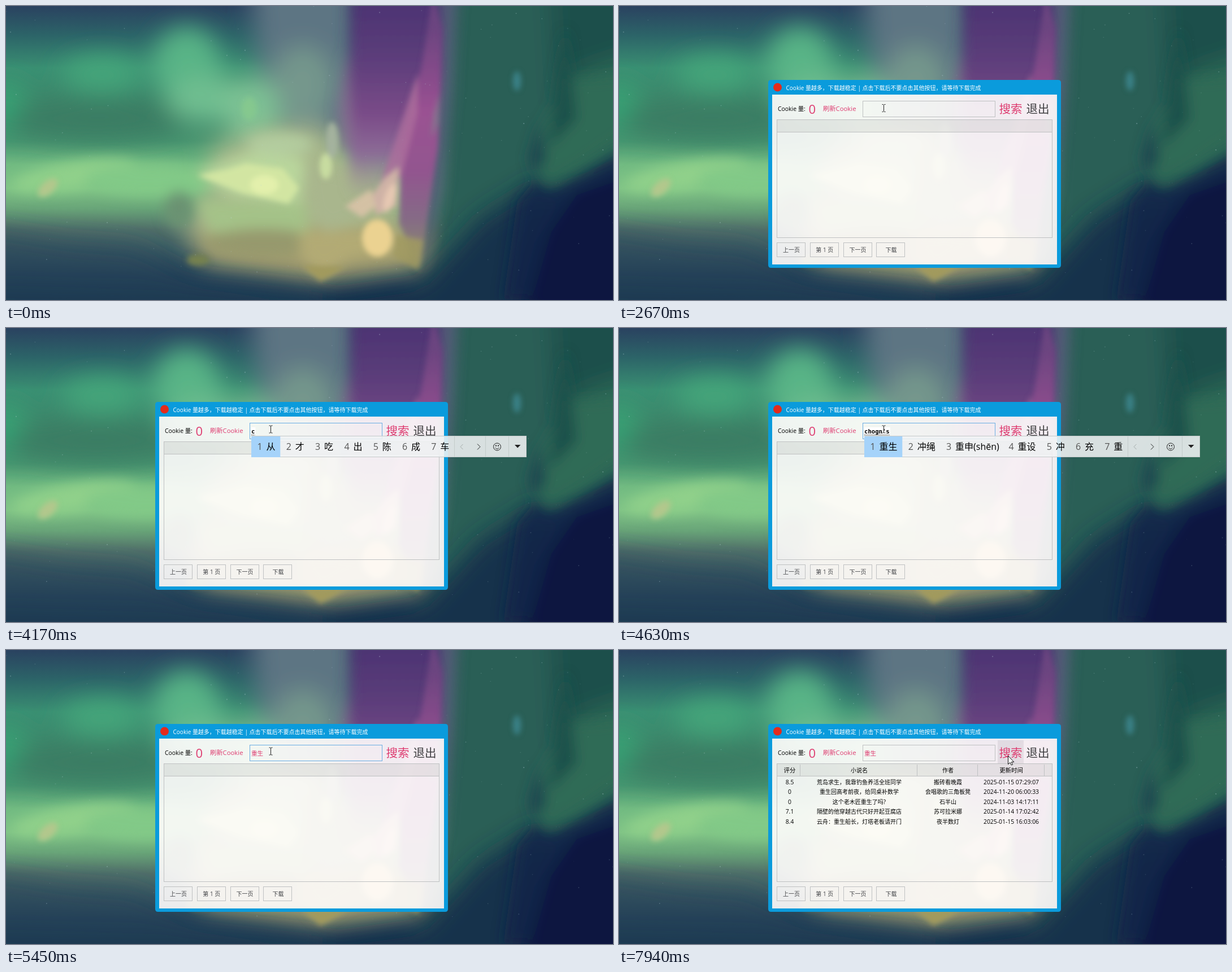
Write an HTML page that moves like this. It is 1074 by 521 pixels and loops after 8 s.

```html
<!DOCTYPE html>
<html lang="zh-CN">
<head>
<meta charset="utf-8">
<style>
html, body { margin: 0; width: 100%; height: 100%; overflow: hidden; background: #16304e; }
svg { display: block; width: 1074px; height: 521px; }
text { font-family: "Open Sans", "Noto Sans CJK SC", "Noto Sans CJK", sans-serif; font-size: 10px; white-space: pre; }
.mid { text-anchor: middle; }
.pink { fill: #de3c70; }
.line { fill: none; stroke: #bfc1c2; }
.mono { font: bold 10.6px "DejaVu Sans Mono", monospace; }
#bar text { font-size: 16px; }
</style>
</head>
<body>
<svg viewBox="0 0 1074 521">
  <defs>
    <linearGradient id="sky" x2="0" y2="1">
      <stop stop-color="#2a4260"/><stop offset=".1" stop-color="#2c6468"/>
      <stop offset=".21" stop-color="#3a8f72"/><stop offset=".37" stop-color="#3d8468"/>
      <stop offset=".46" stop-color="#47946f"/><stop offset=".54" stop-color="#72bb82"/>
      <stop offset=".62" stop-color="#80c486"/><stop offset=".69" stop-color="#68a478"/>
      <stop offset=".76" stop-color="#506f69"/><stop offset=".84" stop-color="#365660"/>
      <stop offset=".92" stop-color="#1f3e56"/><stop offset="1" stop-color="#16304e"/>
    </linearGradient>
    <linearGradient id="violet" gradientUnits="userSpaceOnUse" x1="0" y1="0" x2="0" y2="350">
      <stop stop-color="#4d3473"/><stop offset=".25" stop-color="#5b3d7a"/>
      <stop offset=".55" stop-color="#7a4b88"/><stop offset=".75" stop-color="#8d6c97"/>
      <stop offset="1" stop-color="#a09a94" stop-opacity="0"/>
    </linearGradient>
    <linearGradient id="rose" gradientUnits="userSpaceOnUse" x1="0" y1="40" x2="0" y2="460">
      <stop stop-color="#6c4480"/><stop offset=".35" stop-color="#9a5192"/>
      <stop offset=".6" stop-color="#92558f"/><stop offset=".8" stop-color="#856a86"/>
      <stop offset="1" stop-color="#8b8f68"/>
    </linearGradient>
    <filter id="b5" filterUnits="userSpaceOnUse" x="-100" y="-100" width="1274" height="721"><feGaussianBlur stdDeviation="5"/></filter>
    <filter id="b11" filterUnits="userSpaceOnUse" x="-100" y="-100" width="1274" height="721"><feGaussianBlur stdDeviation="11"/></filter>
    <filter id="b22" filterUnits="userSpaceOnUse" x="-100" y="-100" width="1274" height="721"><feGaussianBlur stdDeviation="22"/></filter>
  </defs>

  <!-- aurora -->
  <rect width="1074" height="521" fill="url(#sky)"/>
  <g filter="url(#b22)">
    <ellipse cx="320" cy="105" rx="60" ry="68" fill="#58b486"/>
    <ellipse cx="170" cy="120" rx="70" ry="32" fill="#45a67a"/>
    <ellipse cx="0" cy="182" rx="40" ry="45" fill="#38a476"/>
    <ellipse cx="160" cy="200" rx="160" ry="36" fill="#3a7d64"/>
    <path d="M430-80H620V230H500L450 130z" fill="#5d7583"/>
    <ellipse cx="525" cy="140" rx="55" ry="70" fill="#75978c"/>
    <ellipse cx="360" cy="165" rx="75" ry="42" fill="#6fbe90"/>
    <ellipse cx="435" cy="185" rx="48" ry="60" fill="#7ec294"/>
    <path d="M360 250L480 215 560 215 620 270 690 300 735 470 560 492 350 460 310 380 370 320z" fill="#a9b88c"/>
    <path d="M330 395H740L735 465 560 490 345 455z" fill="#a69f70"/>
    <path d="M770-80H1160V600H700L745 470z" fill="#2b5e57"/>
    <path d="M960-80H1160V90L1010 130 975 200z" fill="#1c4f4b"/>
    <path d="M1160 70L1010 120 950 290 1010 300 1160 220z" fill="#2f6b57"/>
  </g>
  <g filter="url(#b22)">
    <path d="M945 310L840 375 735 490 560 515-80 500V610H1160V235L1012 310 962 335z" fill="#16304c"/>
    <path d="M1160 250L985 345 935 420 890 610H1160z" fill="#0a1940"/>
    <path d="M-80 385L110 415 230 425 330 478 560 505V540H-80z" fill="#26455a" opacity=".55"/>
  </g>
  <g filter="url(#b11)">
    <path d="M1130 205L1015 285 960 318 938 290 952 210 990 130 1130 120z" fill="#2f6c57" opacity=".8"/>
    <path d="M945 205L955 270 936 300 925 270z" fill="#1b4450"/>
    <path d="M990 40L1010 200 960 250 975 130z" fill="#1c514c"/>
    <path d="M1150 232L1012 304 963 326 938 306 905 345 880 520H1150z" fill="#12264a" opacity=".7"/>
    <path d="M1150 285L1010 335 965 400 925 540H1150z" fill="#0a1840"/>
    <ellipse cx="122" cy="300" rx="112" ry="24" fill="#90d08a" transform="rotate(-9 122 300)"/>
    <ellipse cx="250" cy="308" rx="110" ry="28" fill="#82c987"/>
    <ellipse cx="485" cy="245" rx="58" ry="20" fill="#b3cc9f"/>
    <path d="M335 295L430 260 530 270 520 350 400 335z" fill="#b9d69c"/>
    <path d="M340 345L530 350 535 400 360 400z" fill="#a4c288"/>
    <path d="M525 275L615 300 640 370 570 400 540 370z" fill="#a9b68d"/>
    <ellipse cx="306" cy="360" rx="26" ry="32" fill="#6a9272"/>
    <ellipse cx="455" cy="420" rx="100" ry="26" fill="#96996d"/>
    <path d="M520 400L690 395 700 440 610 445 557 480 520 440z" fill="#b2aa74"/>
  </g>
  <g filter="url(#b11)">
    <path d="M775-50L800-50 790 150 772 330 736 470 740 250z" fill="#535f77"/>
    <path d="M612-50H772L770 120 735 300 705 350 610 330 602 200z" fill="url(#violet)"/>
    <path d="M602 80L616 240 590 260 585 180z" fill="#8b7192" opacity=".7"/>
  </g>
  <g filter="url(#b5)">
    <path d="M755-20L772 40 764 250 733 462 696 385 700 250 735 110z" fill="url(#rose)"/>
    <path d="M728 120L728 190 700 300 655 335 690 235z" fill="#ad6f9d" opacity=".8"/>
    <path d="M766 155L766 205 752 235 757 190z" fill="#85728e"/>
    <path d="M695 285L690 355 655 370 648 335 670 305z" fill="#cfb2a6"/>
    <ellipse cx="679" cy="340" rx="9" ry="26" fill="#e6c8b2" transform="rotate(18 679 340)"/>
    <path d="M600 355L645 325 655 355 630 375z" fill="#d4c1a4"/>
    <ellipse cx="657" cy="411" rx="27" ry="33" fill="#ebd291"/>
    <path d="M690 405L738 415 730 468 685 445z" fill="#a19b62" opacity=".85"/>
    <path d="M390 290L425 279 490 288 518 322 500 350 420 332 340 300z" fill="#d2e5a2"/>
    <ellipse cx="457" cy="317" rx="25" ry="17" fill="#e3f0ac"/>
    <ellipse cx="566" cy="284" rx="11" ry="23" fill="#c8dca0"/>
    <ellipse cx="577" cy="238" rx="11" ry="32" fill="#a4b29e"/>
    <ellipse cx="430" cy="182" rx="13" ry="20" fill="#85c88e"/>
    <ellipse cx="74" cy="322" rx="21" ry="11" fill="#b2c78c" transform="rotate(-42 74 322)"/>
    <ellipse cx="340" cy="450" rx="20" ry="10" fill="#76814f"/>
    <path d="M525 460L557 488 600 462z" fill="#a19a5d"/>
    <ellipse cx="904" cy="133" rx="7" ry="17" fill="#3a8288"/>
  </g>
  <g id="stars" fill="#bcd8dc"></g>

  <!-- application window -->
  <g id="win">
    <path fill-rule="evenodd" fill="#0a9bdc" d="M269 131H777Q782 131 782 136V459Q782 464 777 464H269Q264 464 264 459V136Q264 131 269 131zM271 157V458H775V157z"/>
    <rect x="271" y="157" width="504" height="301" fill="#fefcfc" opacity=".91"/>
    <circle cx="280.500" cy="144" r="7.500" fill="#e32b1c"/>
    <text x="295.500" y="148.500" fill="#fff">Cookie 量越多，下载越稳定 | 点击下载后不要点击其他按钮，请等待下载完成</text>
    <text x="281" y="186" style="font-size:10.4px">Cookie 量:</text>
    <text x="335.500" y="191" class="pink" style="font-size:22px">0</text>
    <text x="361" y="185.500" class="pink" style="font-size:11.300px">刷新Cookie</text>
    <rect x="279.500" y="201.500" width="487" height="209" class="line"/>
    <rect x="280" y="202" width="486" height="21" fill="#12201c" opacity=".065"/>
    <path d="M280 223.500H766" class="line"/>
    <rect id="hover" x="670" y="160" width="46" height="41" fill="#40384c" opacity=".09"/>
    <text x="672.500" y="190" class="pink" style="font-size:20.500px">搜索</text>
    <text x="720.500" y="190" fill="#3f3f41" style="font-size:20.500px">退出</text>
    <g id="buttons" fill="#404246"></g>
    <rect id="field" x="431.500" y="168.500" width="234" height="28" class="line"/>
    <text id="value" x="434" y="187" class="pink" style="font-size:10.600px">重生</text>
    <path id="caret" d="M434.500 176V189" stroke="#222"/>
    <g id="tip">
      <rect x="467.500" y="200.500" width="75" height="17" fill="#fff" stroke="#aaa"/>
      <text x="505" y="213" class="mid" fill="#555">请输入小说名</text>
    </g>
    <g id="table"></g>
    <g id="typed">
      <rect id="typedBox" x="434" y="176" height="14" fill="#fff"/>
      <text id="keys" x="434" y="187" class="mono"></text>
      <path id="dots" stroke="#000" stroke-dasharray="1 1"/>
    </g>
    <g id="bar"></g>
  </g>
  <path id="arrow" d="M.5.5V15.500L4 12.300 6.300 17 8.500 16 6.300 11.500H10.800z" fill="#fff" stroke="#111"/>
  <path id="beam" d="M-3-6.500H-1L0-5.500 1-6.500H3M0-5.500V5.500M-3 6.500H-1L0 5.500 1 6.500H3" fill="none" stroke="#222"/>
</svg>
<script>
const $ = id => document.getElementById(id);
const show = (id, on) => $(id).setAttribute('visibility', on ? 'inherit' : 'hidden');
const mid = (x, y, s, size = 10) =>
  `<text class="mid" x="${x}" y="${y}" style="font-size:${size}px">${s}</text>`;

// faint stars
let seed = 11;
const rnd = () => (seed = seed * 16807 % 2147483647) / 2147483647;
let stars = '';
for (let i = 0; i < 130; i++)
  stars += `<circle cx="${rnd() * 1074}" cy="${rnd() * 480}" r="${.5 + rnd() * .6}" opacity="${.1 + rnd() * .3}"/>`;
$('stars').innerHTML = stars;

$('buttons').innerHTML = ['上一页', '第 1 页', '下一页', '下载'].map((s, i) => {
  const x = 279.5 + i * 58.8;
  return `<rect class="line" x="${Math.floor(x) + .5}" y="419.500" width="50" height="25"/>` + mid(x + 25.5, 436, s);
}).join('');

const columns = [302, 425, 582, 694];
const books = [
  ['8.5', '荒岛求生，我靠钓鱼养活全班同学', '搬砖看晚霞', '2025-01-15 07:29:07'],
  ['0', '重生回高考前夜，给同桌补数学', '会唱歌的三角板凳', '2024-11-20 06:00:33'],
  ['0', '这个老木匠重生了吗?', '石半山', '2024-11-03 14:17:11'],
  ['7.1', '隔壁的他穿越古代只好开起豆腐店', '苏可拉米娜', '2025-01-14 17:02:42'],
  ['8.4', '云舟：重生船长，灯塔老板请开门', '夜半数灯', '2025-01-15 16:03:06']
];
const row = (cells, y) => cells.map((s, i) => mid(columns[i], y, s, i % 3 ? 10 : 10.4)).join('');
$('table').innerHTML = '<path class="line" d="M320.500 203V223M527.500 203V223M634.500 203V223M752.500 203V223"/>' +
  row(['评分', '小说名', '作者', '更新时间'], 217) +
  books.map((b, i) => row(b, 237.5 + i * 17.6)).join('');

// input method: time, composition, candidates
const typing = [
  [4170, 'c', '从 才 吃 出 陈 成 车'],
  [4320, 'cho', '冲 充 重 虫 抽 崇 宠'],
  [4480, 'chog', '重 冲 充 虫 崇 宠 抽'],
  [4630, "chogn's", '重生 冲绳 重申(shēn) 重设 冲 充 重'],
  [4750, "chogn'sheg", '重生 冲绳 重申(shēn) 冲 充 重 虫'],
  [4890, "chogn'shegn", '重生 冲绳 重申(shēn) 冲 充 重 虫'],
  [5020, '', '']
];

function candidateBar(words) {
  let x = 434, items = '';
  words.split(' ').forEach((word, i) => {
    const w = 35.3 + 16 * Math.min(word.length, 2) + (word.length > 2 ? 43 : 0);
    if (!i) items += `<rect x="434" y="192" width="${w}" height="37" fill="#a5d3fa"/>`;
    items += `<text x="${x + 10.5}" y="216" fill="#555">${i + 1}</text><text x="${x + 26.5}" y="216">${word}</text>`;
    x += w;
  });
  x = Math.round(x);
  return `<rect x="434.500" y="191.500" width="${x + 127 - 434}" height="37" fill="#f1f3f4" fill-opacity=".88" stroke="#c6cacb"/>` + items +
    `<g transform="translate(${x} 0)" fill="none" stroke="#222">
      <path stroke="#c3cccb" d="M.5 192V228M55.500 192V228M96.500 192V228"/>
      <path stroke="#a5aaaa" d="M15.500 206L11 210.500 15.500 215"/><path d="M41 205.500L46 210.500 41 215.500"/>
      <circle cx="76" cy="210.500" r="6.500"/><path d="M72.500 212Q76 216.500 79.500 212"/>
      <path fill="#222" stroke="none" d="M73 207.500h2v2h-2zM77 207.500h2v2h-2zM107 207H117.500L112.200 212.500z"/></g>`;
}

// pointer: time, shape, x, y
const pointer = [
  [0, '', 0, 0],
  [2000, 'arrow', 764, 383], [2140, 'arrow', 690, 335], [2260, 'arrow', 585, 262], [2380, 'arrow', 505, 212],
  [2500, 'beam', 471.5, 194], [2670, 'beam', 468.5, 181], [3090, 'beam', 468.5, 179.5],
  [5720, 'beam', 498.5, 189], [5840, 'arrow', 560, 204], [5960, 'beam', 618.5, 183],
  [6110, 'arrow', 685, 187], [6280, 'arrow', 688, 187]
];
const last = (list, t) => list.filter(k => k[0] <= t).pop();
const within = (t, ...spans) => spans.some(([a, b]) => t >= a && t < b);

let step;
function frame(now) {
  const t = now % 8000;
  show('win', t >= 1440);
  show('hover', t >= 6110);
  show('value', t >= 5020);
  show('table', t >= 7940);
  show('tip', within(t, [3620, 4170]));
  show('caret', within(t, [3210, 3470], [4020, 4170], [5020, 5450], [5960, 6420]));
  $('caret').setAttribute('transform', `translate(${t < 5020 ? 0 : 22} 0)`);
  $('field').style.stroke = !within(t, [3090, 6560]) ? '#bfc1c2' : t < 3210 ? '#98b9d5' : '#6baee3';

  const key = last(typing, t);
  show('typed', key && key[1]);
  show('bar', key && key[1]);
  if (key !== step) {
    step = key;
    if (key && key[1]) {
      const w = key[1].length * 6.4;
      $('keys').textContent = key[1];
      $('typedBox').setAttribute('width', w + 1);
      $('dots').setAttribute('d', `M434 189.500h${w}`);
      $('bar').innerHTML = candidateBar(key[2]);
    }
  }

  const [, shape, x, y] = last(pointer, t);
  for (const id of ['arrow', 'beam']) {
    show(id, id === shape);
    $(id).setAttribute('transform', `translate(${x} ${y})`);
  }
  requestAnimationFrame(frame);
}
frame(0);
</script>
</body>
</html>
```
